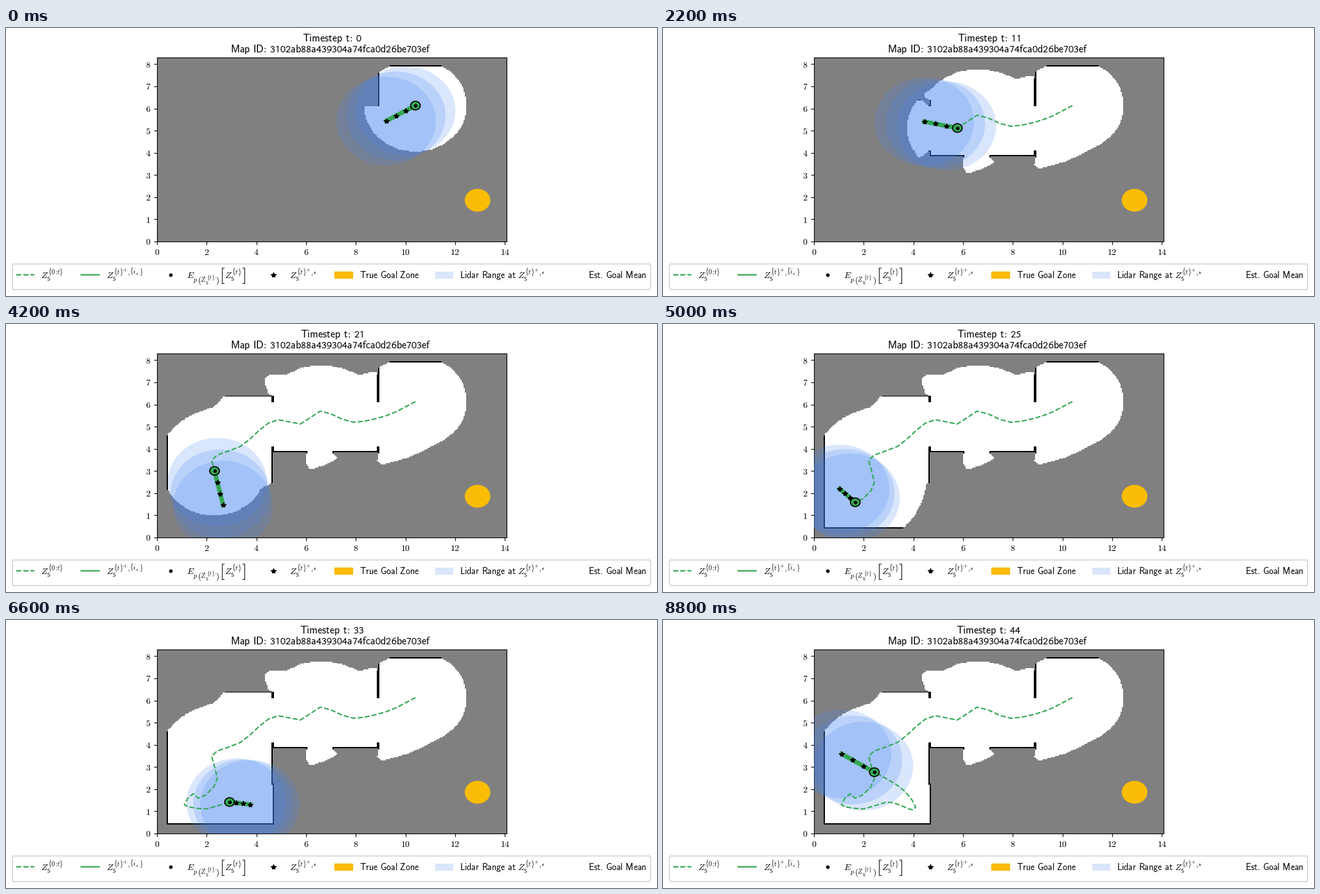
Write a matplotlib script that moves like this. It is 1013 by 418 pixels and loops after 9000 ms.

```python
import numpy as np
import matplotlib.pyplot as plt
from matplotlib.animation import FuncAnimation
from matplotlib.patches import Circle, FancyBboxPatch, Rectangle

plt.rcParams['mathtext.fontset'] = 'cm'

W, H = 1013, 418
STEPS = 45
CELL = 0.05
COLS, ROWS = 283, 167
SCAN_RANGE = 2.04
GREEN, BLUE, GOLD = '#34A853', '#4285F4', '#FBBC05'
MAP_ID = '3102ab88a439304a74fca0d26be703ef'

# Turning points of the robot's route: time step, x, y.
KEYS = np.array([
    (0, 10.40, 6.13), (3, 9.21, 5.49), (6, 7.92, 5.20), (9, 6.57, 5.70),
    (11, 5.77, 5.12), (13, 4.89, 5.31), (17, 3.36, 4.11), (20, 2.20, 3.48),
    (22, 2.43, 2.49), (25, 1.66, 1.59), (26, 1.45, 1.79), (28, 1.10, 1.30),
    (31, 2.00, 1.11), (33, 2.92, 1.42), (38, 3.98, 1.07), (39, 4.09, 1.19),
    (41, 3.65, 1.91), (45, 1.99, 3.04)])
TIMES, POINTS = KEYS[:, 0], KEYS[:, 1:]


def monotone_tangents():
    slopes = np.diff(POINTS, axis=0) / np.diff(TIMES)[:, None]
    a, b = slopes[:-1], slopes[1:]
    inner = np.where(a * b > 0, 2 * a * b / (a + b), 0)
    return np.vstack([slopes[:1], inner, slopes[-1:]])


TANGENTS = monotone_tangents()


def position(t):
    """Cubic Hermite curve through the turning points."""
    i = min(np.searchsorted(TIMES, t, 'right') - 1, len(TIMES) - 2)
    span = TIMES[i + 1] - TIMES[i]
    u = (t - TIMES[i]) / span
    ease = u * u * (3 - 2 * u)
    return ((1 - ease) * POINTS[i] + ease * POINTS[i + 1]
            + span * u * (1 - u) * ((1 - u) * TANGENTS[i] - u * TANGENTS[i + 1]))


PATH = np.array([position(t) for t in range(STEPS + 1)])


def build_walls():
    walls = np.zeros((ROWS, COLS), bool)
    walls[8:128, 8:94] = True          # left room
    walls[9:127, 9:93] = False
    walls[44:128, 92:94] = True        # between left and middle room
    walls[76:160, 177:179] = True      # between middle and right room
    walls[158:160, 177:] = True        # right room, top
    walls[76:78, 92:179] = True        # middle room, bottom
    walls[76:78, 121:141] = False      # its exit
    walls[82:122, 90:180] = False      # doors between the rooms
    return walls


def explore():
    """Occupancy map after each time step: grey unknown, white free, black wall."""
    walls = build_walls()
    grid = np.full((ROWS, COLS), 128, np.uint8)
    angles = np.linspace(0, 2 * np.pi, 1080, endpoint=False)[:, None]
    reach = np.linspace(0, SCAN_RANGE, 100)
    maps = []
    for t in range(STEPS):
        for moment in np.linspace(t - 0.9, t - 0.1, 4).clip(0):
            x, y = position(moment)
            col = ((x + reach * np.cos(angles)) / CELL).astype(int).clip(0, COLS - 1)
            row = ((y + reach * np.sin(angles)) / CELL).astype(int).clip(0, ROWS - 1)
            hit = walls[row, col]
            count = hit.cumsum(axis=1)
            free, first = count == 0, hit & (count == 1)
            grid[row[free], col[free]] = 255
            grid[row[first], col[first]] = 0
        maps.append(grid.copy())
    return maps


MAPS = explore()

fig = plt.figure(figsize=(W / 100, H / 100), dpi=100, facecolor='white')
page = fig.add_axes([0, 0, 1, 1])
page.set(xlim=(0, W), ylim=(H, 0))
page.axis('off')

ax = fig.add_axes([235 / W, (H - 333) / H, 544 / W, 287 / H])
image = ax.imshow(MAPS[0], cmap='gray', vmin=0, vmax=255, origin='lower',
                  extent=(0, COLS * CELL, 0, ROWS * CELL),
                  interpolation='nearest', aspect='auto')
ax.set(xlim=(0, 14.07), ylim=(0, 8.3))
ax.set_xticks(range(0, 15, 2), [f'${v}$' for v in range(0, 15, 2)])
ax.set_yticks(range(9), [f'${v}$' for v in range(9)])

ax.add_patch(Circle((12.9, 1.86), 0.515, color=GOLD, lw=0, zorder=2))
ranges = [ax.add_patch(Circle((0, 0), 2, fc=BLUE, alpha=0.2, lw=0, zorder=3))
          for _ in range(3)]
trail, = ax.plot([], [], '--', color=GREEN, lw=1.5, zorder=4)
plan, = ax.plot([], [], color=GREEN, lw=5, zorder=5)
robot = ax.add_patch(Circle((0, 0), 0.195, fc=GREEN, ec='black', lw=1.2, zorder=6))
stars, = ax.plot([], [], 'k*', ms=6, zorder=7)
dot, = ax.plot([], [], 'k.', ms=6, zorder=8)


def tex(x, y, s, size=10, ha='left'):
    return page.text(x, y, '$' + s + '$', fontsize=size, ha=ha, va='baseline')


# Running-text widths for spaces and punctuation, sans-serif digits.
SANS = str.maketrans({' ': r'\hspace{0.38}', '.': r'.\hspace{-0.2}',
                      ':': r'\hspace{-0.2}:\hspace{-0.2}'}
                     | {str(d): r'\mathrm{' + chr(0x1D7E2 + d) + '}' for d in range(10)})


def sans(s):
    return r'\mathsf{' + s.translate(SANS) + '}'


def state(x, sup):
    """The symbol Z with subscript S and the start of its superscript."""
    tex(x, 390, 'Z')
    tex(x + 9, 394.5, r'\mathsf{S}', 6.6)
    tex(x + 11.3, 384.5, sup, 7.2)


def next_state(x):
    state(x, r'\{t\}')
    tex(x + 29, 380.5, '+', 6, 'center')
    tex(x + 33, 384.5, ',', 7.2)


def best_state(x):
    next_state(x)
    tex(x + 39.3, 384.5, '*', 7.2, 'center')


def draw_legend():
    mid = 385
    page.add_patch(FancyBboxPatch((10, 368), 993, 40, fc='white', ec='0.8', lw=1,
                                  boxstyle='round,pad=0,rounding_size=2.8'))
    page.plot([16, 44], [mid, mid], '--', color=GREEN, lw=1.5)
    state(54, r'\{0')
    tex(78, 384.5, ':', 7.2, 'center')
    tex(89.5, 384.5, r't\}', 7.2, 'right')

    page.plot([117, 145], [mid, mid], color=GREEN, lw=1.5)
    next_state(156)
    tex(192.5, 384.5, r'\{i_a', 7.2)
    tex(214, 384.5, r'\}', 7.2, 'right')

    page.plot(256, mid, 'k.', ms=6)
    tex(281, 390, 'E')
    tex(291, 396, 'p', 7.2)
    tex(297.5, 398, '(', 9.5)
    tex(302, 396, 'Z', 7.2)
    tex(309.5, 399.5, r'\mathsf{S}', 5)
    tex(312, 392, r'\{t\}', 5.5)
    tex(331.5, 398, ')', 9.5, 'right')
    for x, tip in ((336, 339), (371, 368)):
        page.plot([tip, x, x, tip], [374, 374, 398, 398], 'k', lw=0.7)
    state(340, r'\{t\}')

    page.plot(416, mid, 'k*', ms=6)
    best_state(441)

    page.add_patch(Rectangle((511, 380), 28, 10, fc=GOLD, ec=GOLD, lw=1))
    tex(550, 390, sans('True Goal Zone'))

    page.add_patch(Rectangle((667.5, 380), 28.5, 11, fc=BLUE, alpha=0.2, lw=0))
    tex(706, 390, sans('Lidar Range at'))
    best_state(796)
    tex(906, 390, sans('Est. Goal Mean'))


draw_legend()
title = tex(507, 21, sans('Timestep t: 0'), 11.6, 'center')
tex(504.7, 38, sans('Map ID: ' + MAP_ID), 11.6, 'center')


def update(t):
    here, step = PATH[t], PATH[t + 1] - PATH[t]
    ahead = here + np.arange(4)[:, None] * step
    image.set_data(MAPS[t])
    trail.set_data(*PATH[:t + 1].T)
    plan.set_data(*ahead.T)
    stars.set_data(*ahead[1:].T)
    dot.set_data([here[0]], [here[1]])
    robot.center = tuple(here)
    for disc, centre in zip(ranges, ahead[1:]):
        disc.center = tuple(centre)
    title.set_text('$' + sans(f'Timestep t: {t}') + '$')
    return image, trail, plan, stars, dot, robot, title, *ranges


anim = FuncAnimation(fig, update, frames=STEPS, interval=200, repeat=True,
                     repeat_delay=0, blit=False)
plt.show()
```
